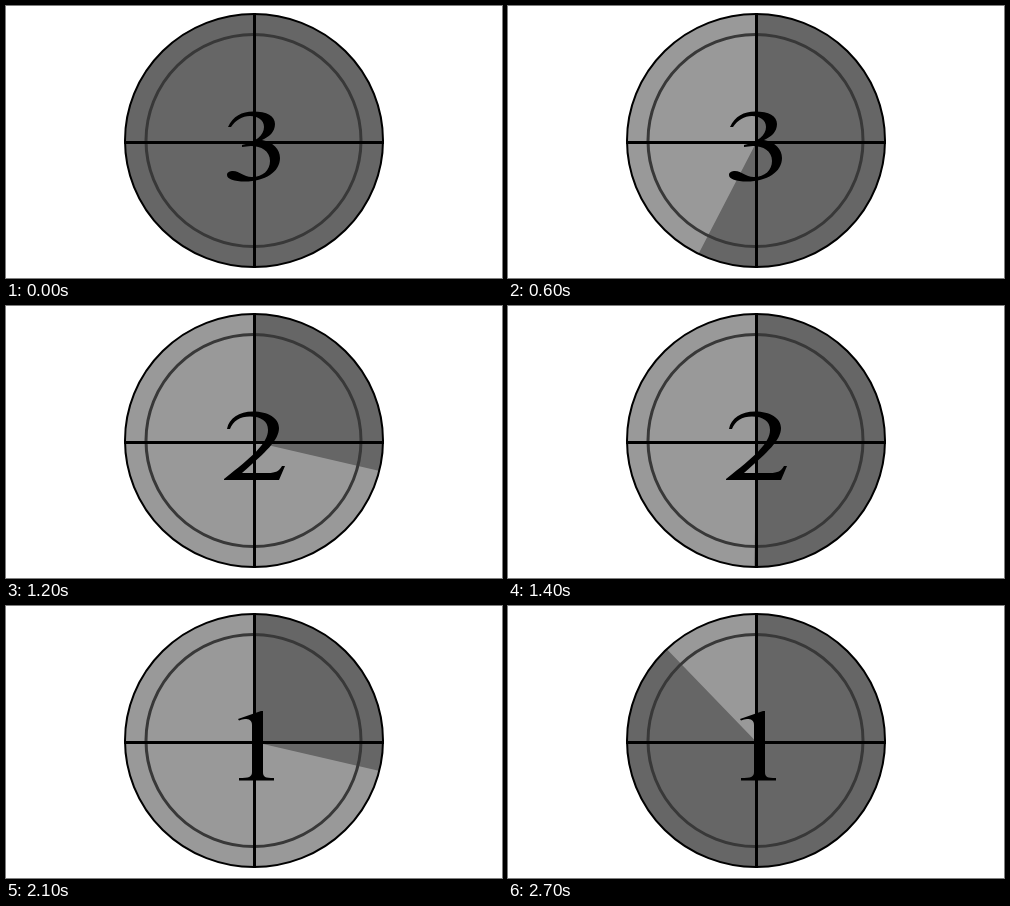
An HTML page with a canvas that plays this animation: 496 px wide and 272 px high, repeating every 2800 ms.

```html
<!DOCTYPE html>
<html lang="en">
<head>
<meta charset="utf-8">
<title>Film leader countdown</title>
<style>
  html, body { margin: 0; width: 100%; height: 100%; overflow: hidden; background: #fff; }
  canvas { display: block; }
</style>
</head>
<body>
<canvas id="stage" width="496" height="272"></canvas>
<script>
const ctx = document.getElementById('stage').getContext('2d');
const STEP = 100, STEPS = 28, CX = 248.5, CY = 136;

// Each turn: first step, numeral outline, and sweep keys as [step in turn, degrees].
const turns = [
  { start: 0, keys: [[0, 0], [4, 135], [9, 316]], numeral: new Path2D(
    'M222 121C227 110 236 105.5 247 105.5C261 105.5 269 110 269 118C269 126 263 131 256 134' +
    'C267 136 274 143 274 152C274 166 259 175.5 239 175.5C228 175.5 221 173 221 169' +
    'C221 166 224 165 227 165C234 165 237 171 246 171C257 171 264 164 264 155' +
    'C264 145 255 140 245 140L236 141V139C250 136 258 129 258 121C258 114 252 110 244 110' +
    'C236 110 230 114 225 121Z') },
  { start: 10, keys: [[0, 0], [2, 103], [7, 298], [8, 333]], numeral: new Path2D(
    'M221 123C223 112 233 105.5 247 105.5C262 105.5 273 112 273 122C273 134 260 146 236 167' +
    'H262C270 167 273 165 276 160H279L273 174H218V173C246 151 262 137 262 124' +
    'C262 115 255 110.5 244 110.5C234 110.5 227 115 224 123Z') },
  { start: 19, keys: [[0, 0], [2, 103], [8, 316]], numeral: new Path2D(
    'M232 113L255 105H257V166C257 171 259 172 268 172V174.5H233V172C243 172 246 171 246 166' +
    'V119C246 114 243 113 239 113C237 113 235 113.5 233 114.5Z') }
];

function sweepAngle(keys, step) {
  const i = Math.max(1, keys.findIndex(([at]) => at >= step));
  const [s0, a0] = keys[i - 1], [s1, a1] = keys[i];
  return a0 + (a1 - a0) * (step - s0) / (s1 - s0);
}

function ellipse(rx, ry, x = 248) {
  const path = new Path2D();
  path.ellipse(x, 134.5, rx, ry, 0, 0, 2 * Math.PI);
  return path;
}

const disc = ellipse(129, 126.5), ring = ellipse(107.5, 106, 247.5);

function stroke(path, color, width) {
  ctx.strokeStyle = color;
  ctx.lineWidth = width;
  ctx.stroke(path);
}

function draw(step) {
  const turn = turns.findLast(t => t.start <= step);
  const degrees = sweepAngle(turn.keys, step - turn.start) || 360;

  ctx.clearRect(0, 0, 496, 272);
  ctx.fillStyle = '#999';
  ctx.fill(disc);

  ctx.save();
  ctx.clip(disc);
  ctx.fillStyle = '#666';
  ctx.beginPath();
  ctx.moveTo(CX, CY);
  ctx.arc(CX, CY, 200, -Math.PI / 2, (degrees - 90) * Math.PI / 180);
  ctx.fill();
  ctx.restore();

  stroke(ring, '#383838', 3);
  stroke(disc, '#000', 2);
  ctx.fillStyle = '#000';
  ctx.fillRect(247, 7, 3, 255);
  ctx.fillRect(118, 135, 260, 3);
  ctx.fill(turn.numeral);
}

function tick() {
  draw(Math.floor(performance.now() / STEP) % STEPS);
  requestAnimationFrame(tick);
}
tick();
</script>
</body>
</html>
```
